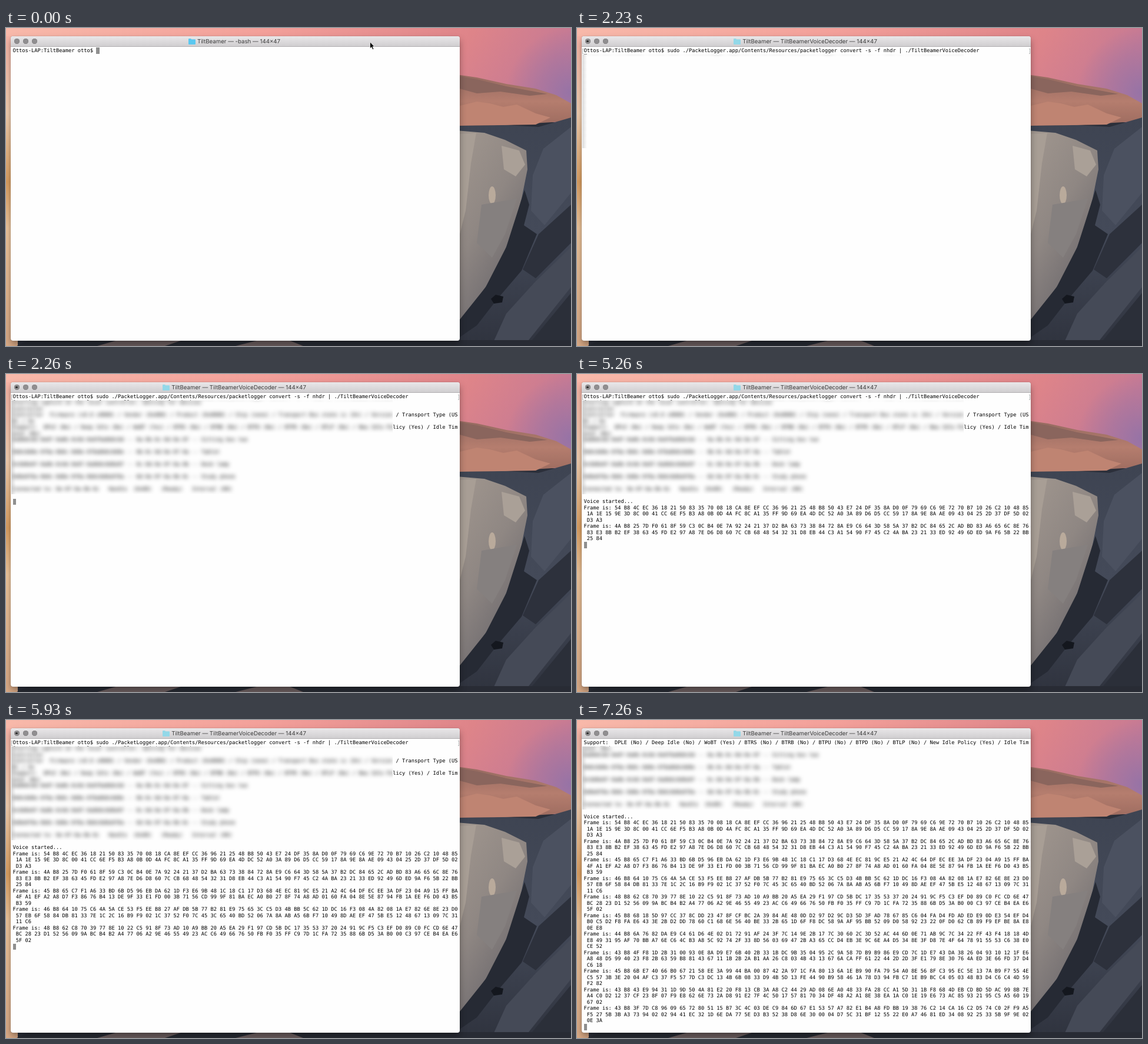
An HTML page for the animation above (8 s loop, 960 by 540 pixels).

```html
<!DOCTYPE html>
<html lang="en">
<head>
<meta charset="utf-8">
<title>Terminal session</title>
<style>
html, body { margin: 0; width: 100%; height: 100%; overflow: hidden; background: #2b2f3a; }
svg { display: block; }
#stage { position: absolute; left: 0; top: 0; width: 960px; height: 540px; overflow: hidden; }
#stage > * { position: absolute; }
#window {
  left: 8px; top: 14px; width: 763px; height: 517px; border-radius: 4px;
  background: #fefefe; box-shadow: 0 0 1px rgba(0,0,0,.55), 0 6px 12px rgba(0,0,0,.35);
}
#bar {
  left: 8px; top: 14px; width: 763px; height: 17px; border-radius: 4px 4px 0 0;
  background: linear-gradient(#e9e7e9, #d0ced0); border-bottom: 1px solid #b2b0b2;
  box-sizing: content-box;
}
#title {
  left: 8px; top: 14px; width: 760px; height: 18px;
  display: flex; align-items: center; justify-content: center; gap: 3px;
  font: 9.7px Inter, "Open Sans", sans-serif; color: #3b3b3b; white-space: pre;
  text-rendering: geometricPrecision;
}
.light { top: 18px; width: 9px; height: 9px; border-radius: 50%; background: #908e90; box-shadow: inset 0 0 0 .5px #7a787a; }
#dot { left: 16.2px; top: 20.7px; width: 3.6px; height: 3.6px; border-radius: 50%; background: #2c2c2c; }
pre {
  margin: 0; color: #000; white-space: pre; text-rendering: geometricPrecision;
  font: 8.72px/10.5px "DejaVu Sans Mono", "Liberation Mono", monospace;
}
#text { left: 11.5px; top: 33.6px; }
#cursor { width: 5.25px; height: 10.5px; background: #8f8f8f; }
#veil { left: 9px; top: 45px; width: 648px; overflow: hidden; background: #fefefe; }
#veil::after { content: ""; position: absolute; inset: 0 auto 0 0; width: 8px; background: linear-gradient(90deg, rgba(0,0,0,.14), transparent); }
#smear { position: absolute; left: 2.5px; top: -11.4px; filter: blur(3.5px); }
.mark { top: 34.5px; width: 1px; height: 7px; border: 1px solid #b4b4b4; }
</style>
</head>
<body>
<div id="stage">
  <svg width="960" height="540" viewBox="0 0 960 540">
    <defs>
      <linearGradient id="sky" x2="1" y2=".12">
        <stop offset="0" stop-color="#f8b9aa"/><stop offset=".45" stop-color="#f3a09a"/>
        <stop offset=".82" stop-color="#de8489"/><stop offset="1" stop-color="#c67a94"/>
      </linearGradient>
      <linearGradient id="side" x2="0" y2="1">
        <stop offset="0" stop-color="#f6b3a6"/><stop offset=".25" stop-color="#f3cfb0"/>
        <stop offset=".47" stop-color="#dca062"/><stop offset=".62" stop-color="#eec59b"/>
        <stop offset="1" stop-color="#d9a985"/>
      </linearGradient>
      <radialGradient id="dusk" gradientUnits="userSpaceOnUse" cx="960" cy="110" r="110">
        <stop offset="0" stop-color="#9673a6"/><stop offset="1" stop-color="#9673a6" stop-opacity="0"/>
      </radialGradient>
      <linearGradient id="peak" x2="0" y2="1">
        <stop offset="0" stop-color="#946a60"/><stop offset=".5" stop-color="#b57d6e"/><stop offset="1" stop-color="#9a6a5e"/>
      </linearGradient>
      <linearGradient id="wall" x2=".6" y2="1">
        <stop offset="0" stop-color="#a1978f"/><stop offset=".5" stop-color="#8f8783"/><stop offset="1" stop-color="#68656a"/>
      </linearGradient>
      <linearGradient id="slate" x2="0" y2="1">
        <stop offset="0" stop-color="#3e4452"/><stop offset=".5" stop-color="#444a59"/><stop offset="1" stop-color="#2f333e"/>
      </linearGradient>
    </defs>
    <rect width="960" height="160" fill="url(#sky)"/>
    <rect x="840" width="120" height="160" fill="url(#dusk)"/>
    <rect y="14" width="20" height="526" fill="url(#side)"/>
    <path d="M765 79L800 84 850 95 900 103 935 114 960 128V158L765 170Z" fill="url(#peak)"/>
    <path d="M771 132L800 125 822 128 845 134 868 130 900 145 925 152 900 164 771 166Z" fill="#bf8472"/>
    <path d="M771 82L800 87 850 99 920 112 890 115 840 108 800 111 771 103Z" fill="#8a655d"/>
    <path d="M765 166L850 165 905 168 960 152V540H765Z" fill="url(#slate)"/>
    <path d="M765 174L813 178 848 190 884 208 886 240 876 290 862 340 845 385 822 430 797 465 765 505Z" fill="url(#wall)"/>
    <path d="M771 180L799 178 790 230 781 310 771 350Z" fill="#a89e95"/>
    <path d="M842 200L872 208 882 232 866 252 846 240Z" fill="#aaa097"/>
    <ellipse cx="826" cy="284" rx="6" ry="15" fill="#b9aa9b"/>
    <path d="M808 300L868 290 848 350 826 390 800 365Z" fill="#85807f"/>
    <path d="M881 275L889 300 880 335 902 350 876 412 835 460 800 505 771 525V495L815 440 850 372Z" fill="#262a34"/>
    <path d="M960 168L913 205 895 250 892 310 915 335 960 280Z" fill="#4b5160"/>
    <path d="M960 300L905 350 878 410 900 425 960 365Z" fill="#2d313c"/>
    <path d="M960 372L900 430 850 485 825 540H880L960 440Z" fill="#454a57"/>
    <path d="M960 450L890 535 886 540H960Z" fill="#2b2f39"/>
    <path d="M824 460L832 453 845 456 843 466 829 468Z" fill="#14171e"/>
    <path d="M18 540L40 530H960V540Z" fill="#282b34"/>
    <path d="M155 540L190 530H300L270 540ZM390 540L430 530H480L505 540Z" fill="#6d5f60"/>
  </svg>

  <div id="window"></div>
  <div id="bar"></div>
  <div class="light" style="left:13.5px"></div>
  <div class="light" style="left:28.5px"></div>
  <div class="light" style="left:43.5px"></div>
  <div id="dot"></div>
  <div id="title">
    <svg width="12" height="10" viewBox="0 0 12 10"><path id="folder" d="M0 1Q0 0 1 0H4L5.2 1.2H11Q12 1.2 12 2.2V9Q12 10 11 10H1Q0 10 0 9Z"/></svg><span id="name"></span>
  </div>
  <div id="cursor"></div>
  <pre id="text"></pre>
  <div id="veil"><pre id="smear"></pre></div>
  <div class="mark" style="left:8.5px;border-right:0"></div>
  <div class="mark" style="left:768px;border-left:0"></div>
  <svg id="pointer" width="960" height="540" viewBox="0 0 960 540">
    <path d="M618.5 23.8V34.8L621.1 32.4 622.9 36.5 624.8 35.7 623 31.7H626Z" fill="#000" stroke="#fff" stroke-width=".7"/>
  </svg>
</div>

<pre id="log" hidden>
Starting capture on the local controller, waiting for devices
Controller
Controller  Firmware (v0.0 c0000) / Vendor (0x000) / Product (0x0000) / Chip (none) / Transport Bus state is (On) / Version / Transport Type (US
B) / On
Support:  DPLE (No) / Deep Idle (No) / WoBT (Yes) / BTRS (No) / BTRB (No) / BTPU (No) / BTPD (No) / BTLP (No) / New Idle Policy (Yes) / Idle Tim
eout (No)
0a0b0c0d-0e0f-0a0b-0c0d-0e0f0a0b0c0d -- 0a-0b-0c-0d-0e-0f -- Sitting box two

0b0c0d0e-0f0a-0b0c-0d0e-0f0a0b0c0d0e -- 0b-0c-0d-0e-0f-0a -- Tablet

0c0d0e0f-0a0b-0c0d-0e0f-0a0b0c0d0e0f -- 0c-0d-0e-0f-0a-0b -- Desk lamp

0d0e0f0a-0b0c-0d0e-0f0a-0b0c0d0e0f0a -- 0d-0e-0f-0a-0b-0c -- Study phone

Connected to: 0e-0f-0a-0b-0c   Handle  (0x00)   (Ready)   Interval (00)

Voice started...
Frame is: 54 B8 4C EC 36 18 21 50 83 35 70 08 18 CA 8E EF CC 36 96 21 25 48 B8 50 43 E7 24 DF 35 8A D0 0F 79 69 C6 9E 72 70 B7 10 26 C2 10 48 85
 1A 1E 15 9E 3D 8C 00 41 CC 6E F5 B3 A8 0B 0D 4A FC 8C A1 35 FF 9D 69 EA 4D DC 52 A0 3A 89 D6 D5 CC 59 17 8A 9E 8A AE 09 43 04 25 2D 37 DF 5D 02
 D3 A3
Frame is: 4A B8 25 7D F0 61 8F 59 C3 0C B4 0E 7A 92 24 21 37 D2 BA 63 73 38 84 72 8A E9 C6 64 3D 58 5A 37 B2 DC 84 65 2C AD BD 83 A6 65 6C 8E 76
 83 E3 8B B2 EF 38 63 45 FD E2 97 A8 7E D6 D8 60 7C CB 68 48 54 32 31 D8 EB 44 C3 A1 54 90 F7 45 C2 4A BA 23 21 33 ED 92 49 6D ED 9A F6 5B 22 BB
 25 84
Frame is: 45 B8 65 C7 F1 A6 33 BD 6B D5 96 EB DA 62 1D F3 E6 9B 48 1C 18 C1 17 D3 68 4E EC 81 9C E5 21 A2 4C 64 DF EC EE 3A DF 23 04 A9 15 FF BA
 4F A1 EF A2 A8 D7 F3 86 76 B4 13 DE 9F 33 E1 FD 00 3B 71 56 CD 99 9F 81 BA EC A0 B0 27 8F 74 A8 AD 01 60 FA 04 8E 5E 87 94 FB 1A EE F6 D0 43 B5
 B3 59
Frame is: 46 B8 64 10 75 C6 4A 5A CE 53 F5 EE B8 27 AF DB 5B 77 B2 81 E9 75 65 3C C5 D3 4B BB 5C 62 1D DC 16 F3 08 4A 82 08 1A E7 82 6E 8E 23 D0
 57 EB 6F 58 84 DB 81 33 7E 1C 2C 16 B9 F9 02 1C 37 52 F0 7C 45 3C 65 40 BD 52 06 7A 8A AB A5 6B F7 10 49 8D AE EF 47 5B E5 12 48 67 13 09 7C 31
 11 C6
Frame is: 48 B8 62 C8 70 39 77 8E 10 22 C5 91 8F 73 AD 10 A9 BB 20 A5 EA 29 F1 97 CD 5B DC 17 35 53 37 20 24 91 9C F5 C3 EF D0 89 C0 FC CD 6E 47
 BC 28 23 D1 52 56 09 9A BC B4 B2 A4 77 06 A2 9E 46 55 49 23 AC C6 49 66 76 50 FB F0 35 FF C9 7D 1C FA 72 35 88 6B D5 3A B0 00 C3 97 CE B4 EA E6
 5F 02
Frame is: 45 B8 68 18 5D 97 CC 37 8C DD 23 47 8F CF BC 2A 39 84 AE 48 0D D2 97 D2 9C D3 5D 3F AD 78 67 85 C6 04 FA D4 FD AD ED E9 0D E3 54 EF D4
 B0 C5 D2 F8 FA E6 43 3E 2B D2 DD 78 60 C1 68 6E 56 40 BE 33 2B 65 1D 6F F8 DC 58 9A AF 95 BB 52 09 D0 58 92 23 22 0F D0 62 CB 89 F9 EF BE 8A E8
 0E E8
Frame is: 44 B8 6A 76 82 DA E9 C4 61 D6 4E 02 D1 72 91 AF 24 3F 7C 14 9E 2B 17 7C 30 60 2C 3D 52 AC 44 6D 0E 71 AB 9C 7C 34 22 FF 43 F4 18 18 4D
 E8 49 31 95 AF 70 BB A7 6E C6 4C B3 A8 5C 92 74 2F 33 8D 56 03 69 47 2B A3 65 CC D4 EB 3E 9C 6E A4 D5 34 8E 3F D8 7E 4F 64 78 91 55 53 C6 38 E0
 CE 52
Frame is: 43 B8 4F F8 1D 2B 31 00 93 0E 8A D9 E7 6B 40 2B 33 1B DC 9B 35 04 95 2C 9A 58 7D B9 B9 86 E9 CD 7C 1D E7 43 DA 38 26 04 93 10 12 1F E6
 A8 48 D5 99 40 23 F8 2B 63 59 B8 81 43 67 11 1B 2B 2A B1 AA 26 C8 03 4B 43 13 67 6A CA FF 61 22 44 2D 2D 3F E1 79 8E 30 76 4A ED 3E 66 FD 37 D4
 C6 18
Frame is: 45 B8 6B E7 40 66 B0 67 21 58 EE 3A 99 44 BA 00 87 42 2A 97 1C FA 80 13 6A 1E B9 90 FA 79 54 A0 8E 56 8F C3 95 EC 5E 13 7A B9 F7 55 4E
 C5 57 3B 3E 20 04 AF C3 37 F5 57 7D C3 DC 13 4B 6B 08 33 D9 4B 5D 13 FE 44 90 B9 58 46 1A 78 D3 94 FB C7 1E B9 BC C4 05 03 48 B3 D4 C6 C4 4D 59
 F2 82
Frame is: 43 B8 43 E9 94 31 1D 9D 50 4A 81 E2 20 F8 13 CB 3A A8 C2 44 29 AD 08 6E A0 48 33 FA 28 CC A1 5D 31 1B F8 68 4D EB CD BD 5D AC 99 8B 7E
 A4 C0 D2 12 37 CF 23 8F 07 F9 E8 62 6E 73 2A D8 91 E2 7F 4C 50 17 57 81 70 34 DF 48 A2 A1 8E 38 EA 1A C0 1E 19 E6 73 AC 85 93 21 95 C5 A5 60 19
 67 02
Frame is: 43 B8 3F 7D C8 96 09 65 72 80 51 15 B7 3C 4C 03 DE C9 84 6D 67 E1 53 57 A7 82 E1 B4 A8 FD BB 19 38 76 C2 14 CA 16 C2 D5 74 C0 2F F9 A5
 F5 27 5B 3B A3 73 94 02 02 94 41 EC 32 1D 6E DA 77 5E D3 B3 52 38 D8 6E 30 00 04 D7 5C 31 BF 12 55 22 E0 A7 46 81 ED 34 08 92 25 33 5B 9F 9E 02
 0E 3A
</pre>

<script>
const LOOP = 8000, COL = 5.25, ROW = 10.5, SCREEN_ROWS = 47, LEFT = 11.5, TOP = 33.25;
const $ = id => document.getElementById(id);
const log = $('log').textContent.replace(/\n$/, '').split('\n');
const prompt = 'Ottos-LAP:TiltBeamer otto$ ';
const command = 'sudo ./PacketLogger.app/Contents/Resources/packetlogger convert -s -f nhdr | ./TiltBeamerVoiceDecoder ';

// Each step changes only the listed values.
const steps = [
  { at: 0, typed: '', entered: false, rows: 0, pointer: true, running: false, veil: false },
  { at: 260, pointer: false },
  { at: 330, typed: 'clear' },
  { at: 800, typed: command },
  { at: 2000, entered: true },
  { at: 2130, running: true },
  { at: 2230, veil: true },
  { at: 2260, rows: 16 },
  { at: 4930, rows: 17 },
  { at: 5260, rows: 23 },
  { at: 5930, rows: 32 },
  { at: 6600, rows: 41 },
  { at: 7260, rows: 50 }
];

const show = (el, on) => { el.style.visibility = on ? 'visible' : 'hidden'; };

function draw(s) {
  const lines = [prompt + s.typed];
  if (s.entered) lines.push(...log.slice(0, s.rows), '');
  const scroll = Math.max(0, lines.length - SCREEN_ROWS);
  const visible = lines.slice(scroll);
  const last = visible.length - 1;

  $('text').textContent = $('smear').textContent = visible.join('\n');
  $('cursor').style.left = LEFT + visible[last].length * COL + 'px';
  $('cursor').style.top = TOP + last * ROW + 'px';
  $('veil').style.height = 159 - scroll * ROW + 'px';
  $('name').textContent = `TiltBeamer — ${s.running ? 'TiltBeamerVoiceDecoder' : '-bash'} — 144×47`;
  $('folder').setAttribute('fill', s.running ? '#93d8e8' : '#5bc8f0');
  show($('dot'), s.running);
  show($('veil'), s.veil);
  show($('pointer'), s.pointer);
  document.querySelectorAll('.mark').forEach(m => show(m, s.entered && !scroll));
}

const start = performance.now();
let shown = 0;
function tick() {
  const t = (performance.now() - start) % LOOP;
  const count = steps.filter(s => s.at <= t).length;
  if (count !== shown) draw(Object.assign({}, ...steps.slice(0, count)));
  shown = count;
  requestAnimationFrame(tick);
}
tick();
</script>
</body>
</html>
```
